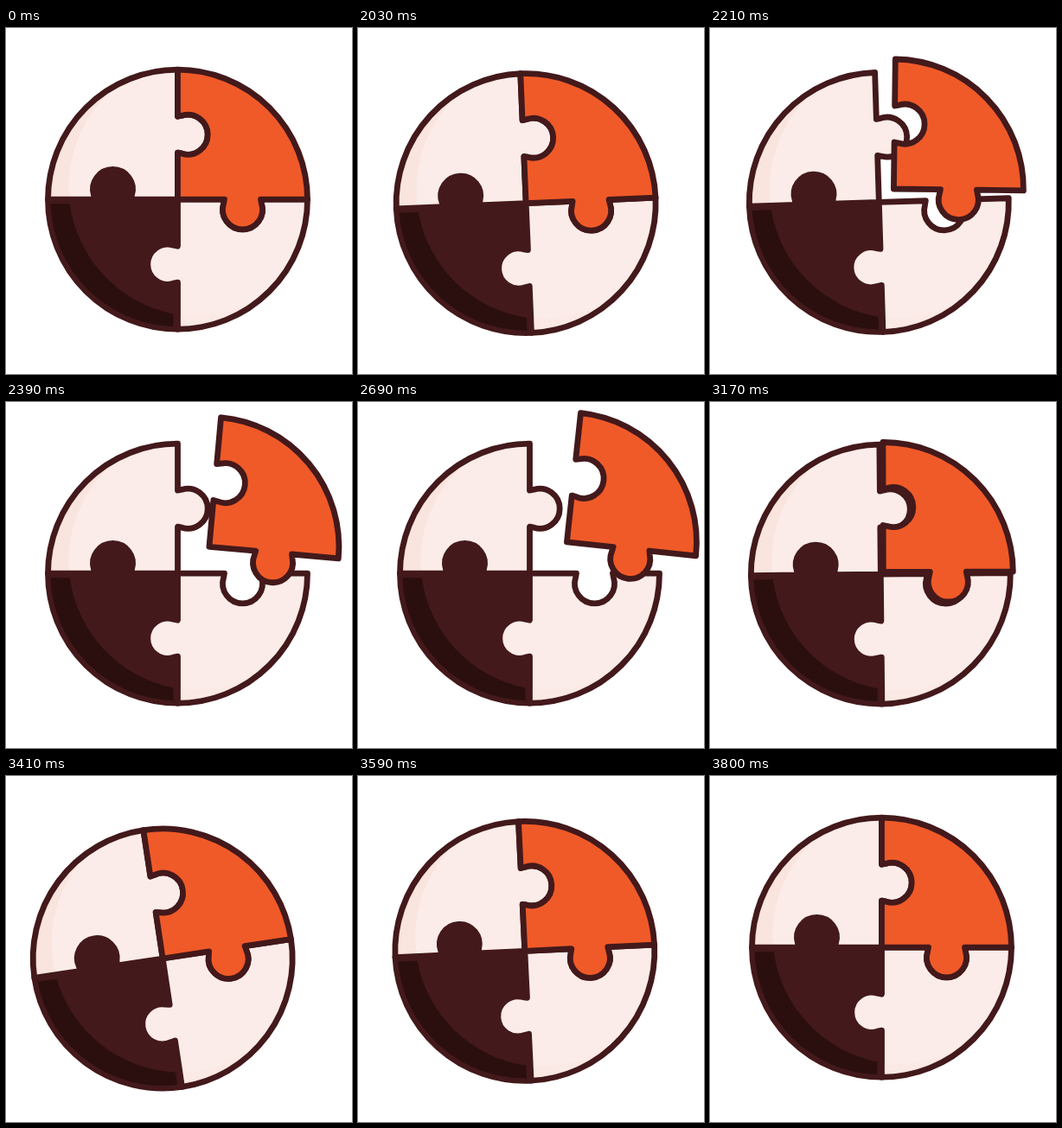
Animation of 400x400 px, one loop 3.83 s. Source, as an HTML page:

```html
<!DOCTYPE html>
<html lang="en">
<head>
<meta charset="utf-8">
<title>Puzzle circle</title>
<style>
  html, body { margin: 0; width: 100%; height: 100%; overflow: hidden; background: #fff; }
  svg { display: block; width: 100vw; height: 100vh; }
  .line { stroke: #43191b; stroke-width: 6.8; stroke-linejoin: round; }
</style>
</head>
<body>
<svg viewBox="0 0 400 400">
  <g id="disc">
    <!-- dark piece -->
    <path class="line" fill="#43191b" d="M-150 0H-96L-97 -5A23 23 0 1 1 -53 -5L-54 0H0V150A150 150 0 0 1 -150 0Z"/>
    <path fill="#2b0f0f" d="M-147 5A147 147 0 0 0 -5 147V132.2A150 150 0 0 1 -124.7 5Z"/>
    <!-- top left piece, shade between fill and outline -->
    <path fill="#fbece9" d="M-150 0A150 150 0 0 1 0 -150V-96L5 -97A23 23 0 1 1 5 -53L0 -54V0H-54L-53 -5A23 23 0 1 0 -97 -5L-96 0Z"/>
    <path fill="#fae4de" d="M-150 0A150 150 0 0 1 -67 -133.8A150 150 0 0 0 -125.2 0Z"/>
    <path class="line" fill="none" d="M-150 0A150 150 0 0 1 0 -150V-96L5 -97A23 23 0 1 1 5 -53L0 -54V0H-54L-53 -5A23 23 0 1 0 -97 -5L-96 0Z"/>
    <!-- bottom right piece -->
    <path class="line" fill="#fbece9" d="M0 0H54L53 5A23 23 0 1 0 97 5L96 0H150A150 150 0 0 1 0 150V96L-5 97A23 23 0 1 1 -5 53L0 54Z"/>
    <path fill="#fae4de" opacity=".4" d="M3.4 146.6A146.6 146.6 0 0 0 88 117.3A150 150 0 0 1 3.4 133.5Z"/>
    <!-- loose piece -->
    <path id="loose" class="line" fill="#f05a28" d="M0 -150A150 150 0 0 1 150 0H96L97 5A23 23 0 1 1 53 5L54 0H0V-54L5 -53A23 23 0 1 0 5 -97L0 -96Z"/>
  </g>
</svg>
<script>
const LOOP = 3830, HOLD = 2030, STEP = 30;
const disc = document.getElementById('disc');
const loose = document.getElementById('loose');

const smooth = (a, b, t) => {
  const u = Math.min(1, Math.max(0, (t - a) / (b - a)));
  return u * u * (3 - 2 * u);
};
const bump = (start, peak, end, t) => smooth(start, peak, t) - smooth(peak, end, t);

// Fast throw, long hang, fast return
const flight = t => Math.max(0, 1 - Math.abs((t - 2647.5) / 537.5) ** 2.55);

function place(node, x, y, angle) {
  node.setAttribute('transform', `translate(${x} ${y}) rotate(${angle})`);
}

function draw(now) {
  let t = now % LOOP;
  t = t < HOLD ? 0 : HOLD + Math.floor((t - HOLD) / STEP) * STEP;
  const windup = bump(1970, 2110, 2265, t);
  const recoil = bump(3130, 3385, 3715, t);
  const out = flight(t);
  place(disc, 198.5 - 11 * windup - 17.6 * recoil,
        198.2 + 11.2 * windup + 13 * recoil,
        -6.2 * windup - 8.7 * recoil);
  place(loose, 43 * out, -36.5 * out, 6.15 * out);
}

const start = performance.now();
function tick() {
  draw(performance.now() - start);
  requestAnimationFrame(tick);
}
tick();
</script>
</body>
</html>
```
